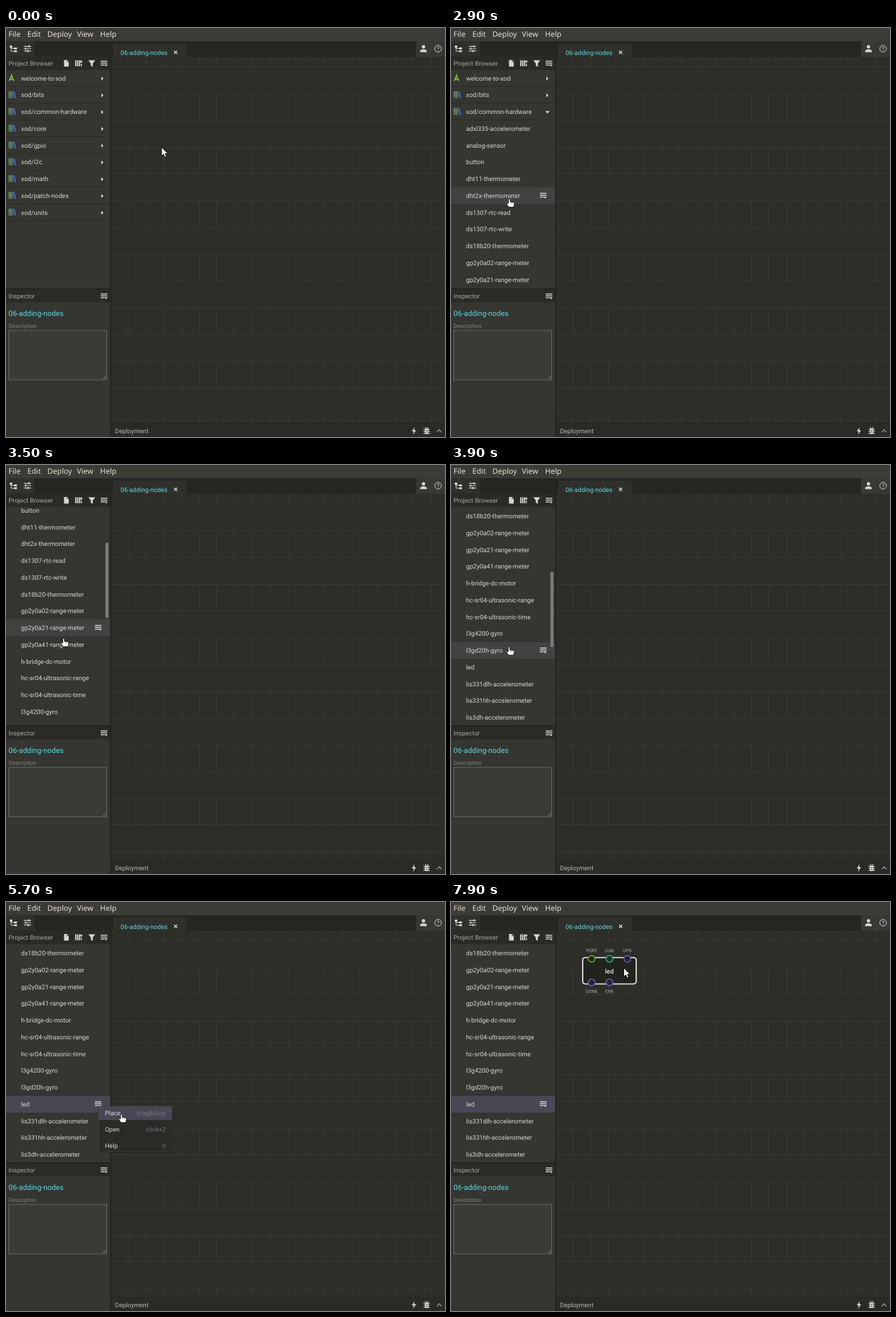
These frames come from a looping animation (700 px wide and 652 px high, 8 s). An HTML page:

```html
<!DOCTYPE html>
<html lang="en">
<head>
<meta charset="utf-8">
<style>
  html, body { margin: 0; width: 100%; height: 100%; overflow: hidden; background: #2d2e29; }
  svg { display: block; width: 700px; height: 652px; font: 10.05px Roboto, sans-serif; }
  .bar { font: 12px "Noto Sans", sans-serif; }
</style>
</head>
<body>
<svg id="stage" viewBox="0 0 700 652" text-rendering="geometricPrecision">
  <defs><clipPath id="listClip"><rect y="67" width="166" height="348.5"/></clipPath></defs>
  <g id="frame"></g>
  <g id="list" clip-path="url(#listClip)"></g>
  <g id="inspector"></g>
  <g id="node"></g>
  <g id="menu"></g>
  <g id="cursor"></g>
</svg>
<script>
const LOOP = 8000, STEP = 100, ROW = 26.75, TOP = 66.7, LED = 19;
const CYAN = '#5bd9e0', LIGHT = '#d6d6d3', PANEL = '#353531', DARK = '#2a2a27';
const layer = id => document.getElementById(id);

const rect = (x, y, w, h, fill, extra = '') =>
  `<rect x="${x}" y="${y}" width="${w}" height="${h}" fill="${fill}" ${extra}/>`;
const text = (x, y, s, fill = LIGHT, extra = '') => `<text x="${x}" y="${y}" fill="${fill}" ${extra}>${s}</text>`;
const path = (d, fill, extra = '') => `<path d="${d}" fill="${fill}" ${extra}/>`;
const line = (d, color, width = 1, extra = '') =>
  path(d, 'none', `stroke="${color}" stroke-width="${width}" ${extra}`);
const at = (x, y, body) => `<g transform="translate(${x} ${y})">${body}</g>`;

const menuIcon = (x, y) => at(x, y, line('M0 1H10.5M0 4H10.5M0 7H6', LIGHT, 1.4) + path('M6 6.2H11L8.5 9.4Z', LIGHT));

const groups = ['welcome-to-xod', 'xod/bits', 'xod/common-hardware', 'xod/core', 'xod/gpio',
  'xod/i2c', 'xod/math', 'xod/patch-nodes', 'xod/units'];
const parts = ['adxl335-accelerometer', 'analog-sensor', 'button', 'dht11-thermometer', 'dht2x-thermometer',
  'ds1307-rtc-read', 'ds1307-rtc-write', 'ds18b20-thermometer', 'gp2y0a02-range-meter', 'gp2y0a21-range-meter',
  'gp2y0a41-range-meter', 'h-bridge-dc-motor', 'hc-sr04-ultrasonic-range', 'hc-sr04-ultrasonic-time',
  'l3g4200-gyro', 'l3gd20h-gyro', 'led', 'lis331dlh-accelerometer', 'lis331hh-accelerometer', 'lis3dh-accelerometer'];

// Pointer moves: first step, last step, end position, shape on the way
const moves = [
  [700, 900, 186, 154, 'arrow'], [1000, 1100, 158, 133, 'hand'],
  [1300, 1500, 127, 131, 'hand'], [1700, 1700, 124, 132, 'hand'],
  [2300, 2900, 93, 272, 'hand'], [3000, 3100, 92, 276, 'hand'],
  [3900, 4300, 94, 314, 'hand'], [4500, 5000, 147, 325, 'arrow'],
  [5500, 5700, 184, 338, 'hand'], [6500, 6500, 184, 338, 'arrow'],
  [6700, 7100, 266, 236, 'arrow'], [7600, 7900, 275.5, 105, 'arrow']
];

// Wheel scrolling: time, offset, row still marked as hovered
const wheel = [[3000, 28, 7], [3100, 80, 8], [3200, 100, 10], [3300, 106.5, 11],
  [3500, 141.5, 12], [3600, 215, 14], [3700, 266, 14]];

function pointer(t) {
  let p = { x: 248, y: 190, shape: 'arrow' };
  for (const [start, end, x, y, shape] of moves) {
    if (t < start) break;
    const k = Math.min(1, (t - start + STEP) / (end - start + STEP));
    const e = 1 - (1 - k) ** 2;
    p = { x: p.x + (x - p.x) * e, y: p.y + (y - p.y) * e, shape };
  }
  return p;
}

function drawGrid() {
  let d = '';
  for (let y = 20; y < 630; y += 85.25) {
    const a = Math.max(46, y), b = Math.min(630, y + 42);
    if (a > 46) d += `M168 ${a}H700`;
    if (b < 630) d += `M168 ${b}H700`;
    for (let x = 194.7; x < 700; x += 28.4) d += `M${x} ${a}V${b}`;
  }
  return line(d, '#393a35');
}

function drawFrame() {
  const bar = [['File', 4], ['Edit', 34], ['Deploy', 66], ['View', 113], ['Help', 150]];
  return rect(0, 0, 700, 652, '#2d2e29') + drawGrid()
    + rect(0, 0, 700, 21, '#3c3b35') + bar.map(([s, x]) => text(x, 14.3, s, '#e2dfd7', 'class="bar"')).join('')
    + rect(0, 21, 700, 25, '#252622') + rect(0, 21, 46, 25, '#30302c')
    + path('M171 46V27Q171 25 173 25H286Q288 25 288 27V46Z', '#2f302b')
    + text(182.8, 42.8, '06-adding-nodes', CYAN) + line('M268 36.3l5 5m0-5l-5 5', LIGHT, 1.5)
    + rect(654, 21, 46, 25, '#383834')
    + `<circle cx="665.7" cy="30" r="2.7" fill="${LIGHT}"/>` + path('M660.4 38.5V36.5Q661 34 665.7 34T671 36.5V38.5Z', LIGHT)
    + `<circle cx="689" cy="33" r="5.3" fill="none" stroke="${LIGHT}"/>` + text(689, 36, '?', LIGHT, 'text-anchor="middle" font-size="8.5"')
    + rect(6, 28, 4, 3.5, LIGHT) + rect(13, 31, 4.5, 3, LIGHT) + rect(13, 35.5, 4.5, 3, LIGHT)
    + line('M8 31V37H13M8 32.5H13', LIGHT)
    + line('M28.5 29.3H40M28.5 33H40M28.5 36.7H40', LIGHT, 1.2) + line('M36.5 27.5v3.6M31.5 31.2v3.6M35 35v3.6', LIGHT, 1.6)
    + rect(0, 46, 167, 606, PANEL) + rect(0, 45, 167, 22, DARK)
    + text(4, 60, 'Project Browser', '#a8a8a4')
    + path('M92.5 51H97.5L100 53.7V61.5H92.5Z', LIGHT) + path('M97 51.8V54.3H99.4Z', DARK)
    + line('M111.3 51.5V61M114.3 51.5V61M117.3 51.5V61', LIGHT, 2) + line('M120 51.5v4m-2-2h4M120.3 57V61', LIGHT, 1.5)
    + path('M131.3 51.5H142.3L138.4 56.5V62L135.2 60V56.5Z', LIGHT) + menuIcon(151, 52)
    + rect(0, 415.5, 167, 22, DARK) + rect(0, 415, 167, 1.5, '#20201e')
    + text(4, 431.3, 'Inspector', '#a8a8a4') + menuIcon(151, 423)
    + rect(166, 46, 2, 606, '#22231f')
    + rect(168, 630, 532, 22, DARK) + rect(168, 630, 532, 1, '#23241f')
    + text(173.8, 646.2, 'Deployment', '#b6b6b2')
    + path('M651.5 636.5L647 643H650L648.8 648.5L654 641.2H651Z', LIGHT)
    + `<ellipse cx="670.8" cy="643" rx="3.2" ry="4.6" fill="${LIGHT}"/>`
    + line('M665.5 639.5H676M665.5 643H676M665.5 646.5H676M668.3 636.5L670 638.5M673.3 636.5L671.6 638.5', LIGHT, 1.2)
    + line('M669.5 642h2.6m-2.6 2.4h2.6', DARK, 0.9)
    + line('M687 644.5L690.8 640.5L694.6 644.5', '#8c8c88', 1.6);
}

const bookIcon = line('M5.2 -6V5', '#85804f', 2.2) + line('M8.2 -6V5', '#42a37c', 2.2)
  + line('M10.9 -6V5', '#4d877f', 1.4) + line('M12.4 -5.6L15.2 4.8', '#5c5ac4', 2.4) + line('M4 2.5H9.5', '#35524c', 0.8);
const projectIcon = line('M8.8 -6.6V-4M8.8 -4L5 4.4M8.8 -4L12.6 4.4M6.3 1.3Q9 3 11.5 1.3', '#84bd3a', 1.8);

function drawList(t, cursor) {
  const open = t >= 1900;
  const state = wheel.filter(w => w[0] <= t).pop();
  const offset = state ? state[1] : 0;
  const selected = t >= 5200;
  let hover = -1;
  if (t >= 3000 && t < 3900) hover = state[2];
  else if (t >= 2300 && t < 5200) hover = Math.floor((cursor.y + 1 + offset - TOP) / ROW);
  const names = open ? [...groups.slice(0, 3), ...parts] : groups;
  let out = '';
  names.forEach((name, i) => {
    const y = TOP + i * ROW - offset, mid = y + ROW / 2;
    if (y < 30 || y > 416) return;
    const isGroup = !open || i < 3;
    const active = !isGroup && (selected ? i === LED : i === hover);
    if (active) out += rect(0, y, 166, ROW, selected ? '#484855' : '#424241');
    out += text(24, mid + 3.6, name);
    if (active) out += menuIcon(141.7, mid - 4.8);
    if (!isGroup) return;
    out += at(0, mid, i ? bookIcon : projectIcon) + rect(0, y + ROW - 0.8, 166, 1, '#292926');
    out += open && i === 2 ? path(`M150.3 ${mid - 1}h7l-3.5 3.6z`, LIGHT) : path(`M152 ${mid - 2.7}v6.4l3.4 -3.2z`, LIGHT);
  });
  if (state && t < 5700) out += rect(158.5, 71.3 + offset * 0.372, 5, 120, '#7b7b78', 'rx="2"');
  return out;
}

function drawInspector(chosen) {
  const small = 'font-size="8.8"', box = 'stroke="#6c6c68"';
  if (!chosen) {
    return text(4, 459.3, '06-adding-nodes', CYAN, 'font-size="11.8"') + text(4, 478, 'Description', '#858580', small)
      + rect(4.5, 482, 156, 79, '#3a3a36', box) + line('M154.5 559.5L159.5 554.5M157.5 559.5L159.5 557.5', '#a0a09c', 0.8);
  }
  const field = ([label, value], i) => text(4, 488 + i * 24, label, '#a0a09c', small)
    + rect(72.5, 475 + i * 24, 88, 18, '#3a3a36', box) + text(77, 487.5 + i * 24, value);
  return text(4, 459.3, 'led', CYAN, 'font-size="11.8"')
    + [['PORT', 'D13'], ['LUM', '0'], ['UPD', 'Continuously'], ['Label', '']].map(field).join('')
    + text(4, 586, 'Description', '#858580', small) + rect(4.5, 590, 156, 61, '#3a3a36', box);
}

function drawNode(stroke) {
  const pin = ([label, x, y, color]) =>
    `<circle cx="${x}" cy="${y}" r="5.3" fill="#252622" stroke="${color}" stroke-width="1.7"/>`
    + text(x, y < 110 ? 80 : 144.6, label, '#a9a9a5', 'text-anchor="middle" font-size="7.2"');
  const pins = [['PORT', 224.2, 90.6, '#68a02d'], ['LUM', 252.6, 90.6, '#2fa47e'], ['UPD', 281, 90.6, '#6559bb'],
    ['DONE', 224.2, 128.2, '#6559bb'], ['ERR', 252.6, 128.2, '#6559bb']];
  return rect(210, 88.6, 85.3, 42, '#22221f', `rx="4" stroke="${stroke}" stroke-width="1.9"`)
    + text(252.6, 114, 'led', '#e4e4e1', 'text-anchor="middle" font-weight="500"') + pins.map(pin).join('');
}

function drawMenu(hovered) {
  const item = ([name, key], i) => text(157.7, 340.4 + i * 25.9, name)
    + text(254.7, 340.4 + i * 25.9, key, '#74747a', 'text-anchor="end"');
  return rect(148, 327, 119, 73, '#000', 'opacity=".25" rx="2"')
    + rect(147.5, 325.5, 117.5, 72.5, DARK, 'stroke="#454543" stroke-width=".8"')
    + (hovered ? rect(148, 326, 116.5, 21.5, '#484855') : '')
    + [['Place', 'drag&amp;drop'], ['Open', 'click×2'], ['Help', 'h']].map(item).join('');
}

const shapes = {
  arrow: path('M0 0V14L3.2 11.2L5.4 16L7.8 15L5.6 10.3H10Z', '#fff', 'stroke="#111" stroke-width="1"'),
  hand: path('M-1.4 1Q0 -.8 1.2 1V5L7 6Q8.2 6.3 8 8L7 13.4H-.8L-4 9Q-4.2 7 -2.4 7.3L-1.4 8Z', '#fff',
    'stroke="#111" stroke-width=".9" stroke-linejoin="round"') + line('M2.6 6V8.2M4.7 6.4V8.4', '#555', 0.6)
};

function draw(t) {
  const cursor = pointer(t);
  const chosen = t >= 6500 && t < 7400;
  layer('list').innerHTML = drawList(t, cursor);
  layer('inspector').innerHTML = drawInspector(chosen);
  layer('node').innerHTML = t < 6500 ? '' : drawNode(chosen ? CYAN : t >= 7900 ? '#e6e6e3' : '#9b9b97');
  layer('menu').innerHTML = t >= 5200 && t < 6500 ? drawMenu(t >= 5500) : '';
  layer('cursor').innerHTML = at(cursor.x, cursor.y, shapes[cursor.shape]);
}

layer('frame').innerHTML = drawFrame();
const began = performance.now();
let shown = -1;
function tick() {
  const t = Math.floor((performance.now() - began) % LOOP / STEP) * STEP;
  if (t !== shown) draw(shown = t);
  requestAnimationFrame(tick);
}
tick();
</script>
</body>
</html>
```
